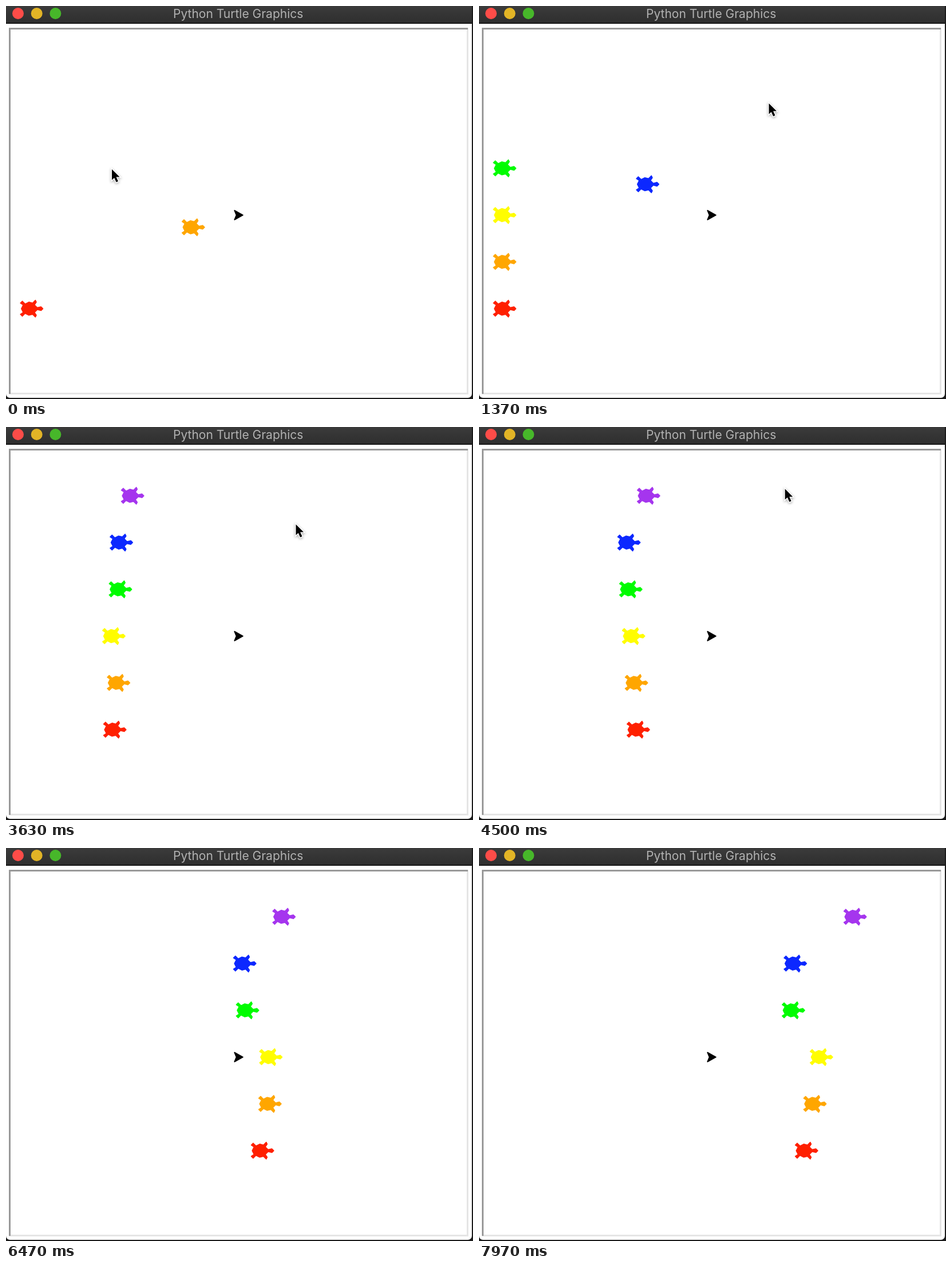
An HTML page with a canvas for the animation above (8000 ms loop, 816 by 686 pixels).

```html
<!DOCTYPE html>
<html lang="en">
<head>
<meta charset="utf-8">
<title>Python Turtle Graphics</title>
<style>
  html, body { margin: 0; width: 100%; height: 100%; overflow: hidden; background: #1b1b1b; }
  canvas { display: block; }
</style>
</head>
<body>
<canvas id="stage" width="816" height="686"></canvas>
<script>
const ctx = document.getElementById('stage').getContext('2d');
const LOOP = 8000;
const UNIT = 1.633;                  // pixels per turtle unit
const ORIGIN = { x: 413.9, y: 365 };
const START_X = -230;
const HOP = 11.979;                  // longest step on the way to the start line
const ROUND = 88;                    // ms for every turtle to move once

const shape = points => {
  const path = new Path2D();
  points.forEach(([x, y]) => path.lineTo(x, y));
  path.closePath();
  return path;
};

// Shapes face east; the turtle is one half mirrored on its axis.
const half = [[16, 0], [14, 2], [10, 1], [7, 4], [9, 7], [8, 9], [5, 6], [1, 7],
  [-3, 5], [-6, 8], [-8, 6], [-5, 4], [-7, 0]];
const turtleShape = shape([...half, ...half.slice(1, -1).reverse().map(([x, y]) => [x, -y])]);
const arrowShape = shape([[0, 0], [-9, 5], [-7, 0], [-9, -5]]);
const pointerShape = shape([[0, 0], [0, 18.8], [4.2, 14.9], [7.6, 22.6], [11, 21.1],
  [7.6, 13.6], [13.6, 13.6]]);

// Race legs end at these times; each turtle lists its distance at the end of each leg.
const raceTimes = [2075, 3630, 5330, 6470, 7970];
const turtles = [
  ['#ff2000', 89, 190, 247, 323],
  ['#ffa600', 93, 185, 255, 332],
  ['#fffd00', 88, 182, 256, 339],
  ['#00fc00', 95, 170, 231, 309],
  ['#0c28ff', 96, 171, 228, 311],
  ['#a535ee', 108, 205, 270, 375],
].map(([color, ...run], i) => {
  const y = -100 + 50 * i;
  return { color, y, run: [0, ...run], hops: 1 + Math.floor(Math.hypot(START_X, y) / HOP) };
});

const clamp = (v, lo, hi) => Math.min(hi, Math.max(lo, v));
const mix = (a, b, p) => a + (b - a) * p;
const smooth = p => p * p * (3 - 2 * p);
const noise = n => { const s = Math.sin(n * 12.9898) * 43758.5453; return s - Math.floor(s); };

// The first turtle is already in place at t = 0; the hops get slightly quicker.
const hopsDone = t => turtles[0].hops + Math.floor(5.3 + 0.0409 * t + 3.24e-6 * t * t);

// Turtles take turns within a round, each moving by an uneven step.
function distanceRun(index, t) {
  const { run } = turtles[index];
  const leg = clamp(raceTimes.findLastIndex(time => time <= t), 0, raceTimes.length - 2);
  const [start, end] = raceTimes.slice(leg, leg + 2);
  const rounds = Math.round((end - start) / ROUND);
  const turn = (t - start) / (end - start) * rounds + 1 - (index + 0.5) / turtles.length;
  const step = clamp(Math.floor(turn), 0, rounds);
  const uneven = step % rounds ? (noise(leg * 131 + index * 17 + step) - 0.5) * 2.4 : 0;
  return mix(run[leg], run[leg + 1], step / rounds) + uneven;
}

// Shapes sit on whole units.
function drawShape(path, x, y, color) {
  ctx.save();
  ctx.translate(ORIGIN.x + Math.round(x) * UNIT, ORIGIN.y + Math.round(-y) * UNIT);
  ctx.scale(UNIT, UNIT);
  ctx.fillStyle = ctx.strokeStyle = color;
  ctx.lineWidth = 1;
  ctx.lineJoin = 'round';
  ctx.fill(path);
  ctx.stroke(path);
  ctx.restore();
}

function drawTurtles(t) {
  let hops = hopsDone(t);
  turtles.forEach((turtle, i) => {
    if (hops >= 0) {
      const p = Math.min(1, hops / turtle.hops);
      drawShape(turtleShape, START_X * p + distanceRun(i, t), turtle.y * p, turtle.color);
    }
    hops -= turtle.hops;
  });
}

function drawPointer(t) {
  const arrive = smooth(clamp((t - 200) / 950, 0, 1));
  const leave = smooth(clamp((t - 4250) / 700, 0, 1));
  ctx.save();
  ctx.translate(185 + 321.5 * arrive + 96 * leave, 285 - 115 * arrive - 211 * leave);
  ctx.shadowColor = 'rgba(0,0,0,.35)';
  ctx.shadowBlur = 4;
  ctx.shadowOffsetY = 1.5;
  ctx.strokeStyle = '#fff';
  ctx.lineWidth = 3;
  ctx.stroke(pointerShape);
  ctx.shadowColor = 'transparent';
  ctx.fillStyle = '#000';
  ctx.fill(pointerShape);
  ctx.restore();
}

function rect(color, x, y, w, h) {
  ctx.fillStyle = color;
  ctx.fillRect(x, y, w, h);
}

function drawWindow() {
  rect('#1b1b1b', 0, 0, 816, 686);
  ctx.fillStyle = '#fff';
  ctx.beginPath();
  ctx.roundRect(0, 0, 814, 684, [0, 0, 7, 7]);
  ctx.fill();

  const bar = ctx.createLinearGradient(0, 0, 0, 30);
  bar.addColorStop(0, '#3b3b3b');
  bar.addColorStop(1, '#2e2e2e');
  rect(bar, 0, 0, 814, 30);
  rect('#0c0c0c', 0, 29.5, 814, 1.5);

  ['#fd4c48', '#e2b426', '#47b72a'].forEach((color, i) => {
    ctx.fillStyle = color;
    ctx.beginPath();
    ctx.arc(21 + 32.7 * i, 13, 10, 0, Math.PI * 2);
    ctx.fill();
  });

  ctx.fillStyle = '#b2b2b2';
  ctx.font = '21px Inter, Roboto, sans-serif';
  ctx.textAlign = 'center';
  ctx.fillText('Python Turtle Graphics', 405.7, 21);

  rect('#e5e5e5', 805, 38, 3, 640);
  rect('#e5e5e5', 5, 675, 803, 3);
  rect('#999', 5, 38, 802, 3);
  rect('#999', 5, 38, 3, 639);
}

function frame() {
  const t = performance.now() % LOOP;
  drawWindow();
  drawShape(arrowShape, 0, 0, '#000');
  drawTurtles(t);
  drawPointer(t);
  requestAnimationFrame(frame);
}
frame();
</script>
</body>
</html>
```
